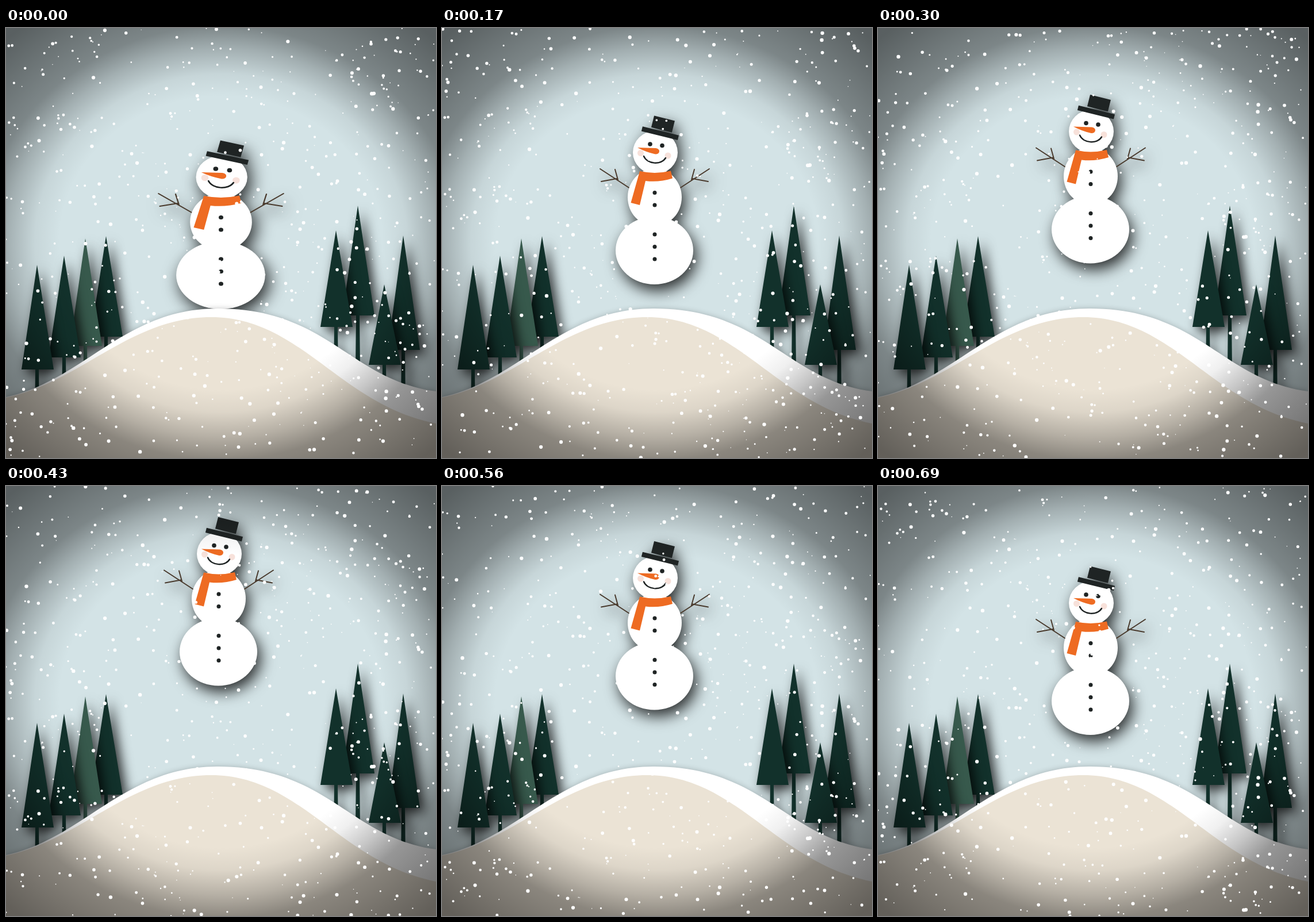
Recreate the animation shown at these times as an HTML page with a canvas. Size 748 by 748 pixels, loop 0.82 s.

```html
<!DOCTYPE html>
<html lang="en">
<head>
<meta charset="utf-8">
<title>Jumping snowman</title>
<style>
  html, body { margin: 0; width: 100%; height: 100%; overflow: hidden; }
  svg, canvas { position: absolute; left: 0; top: 0; width: 748px; height: 748px; }
  .tree { fill: #12312b; filter: drop-shadow(8px 8px 10px rgba(0, 0, 0, .8)); }
  .light { fill: #37594c; }
  .hill { filter: drop-shadow(0 0 5px rgba(0, 0, 0, .22)); }
  #man { filter: drop-shadow(6px 11px 13px rgba(0, 0, 0, .8)); }
  .line { fill: none; stroke: #1f2424; stroke-width: 2.5; stroke-linecap: round; }
  #arms { stroke: #493a2d; stroke-width: 2; }
  .dark { fill: #1f2424; }
  .orange { fill: #ee6b22; }
  .cheek { fill: #f7e1da; }
</style>
</head>
<body>
<svg viewBox="0 0 748 748">
  <defs>
    <radialGradient id="vignette" gradientUnits="userSpaceOnUse" cx="0" cy="0" r="1"
      gradientTransform="translate(374 374) scale(540 490)">
      <stop offset=".52" stop-opacity="0"/>
      <stop offset=".6" stop-opacity=".06"/>
      <stop offset=".69" stop-opacity=".23"/>
      <stop offset=".77" stop-opacity=".41"/>
      <stop offset="1" stop-opacity=".58"/>
    </radialGradient>
  </defs>
  <rect width="748" height="748" fill="#d3e3e6"/>
  <g id="trees"></g>
  <g id="man">
    <g id="arms" class="line"></g>
    <g fill="#fff">
      <ellipse cx="369.5" cy="387" rx="67.5" ry="59"/>
      <ellipse cx="370" cy="294.5" rx="47" ry="50"/>
      <ellipse cx="371" cy="216.5" rx="39" ry="37.5"/>
    </g>
    <g class="dark" transform="translate(380 183) rotate(14)">
      <rect x="-33" y="-4" width="65" height="8.5"/>
      <rect x="-18" y="-27" width="37" height="21"/>
    </g>
    <circle class="cheek" cx="345.5" cy="217.5" r="5.5"/>
    <circle class="cheek" cx="393" cy="222" r="5.5"/>
    <path class="orange" d="M340 208 372 209Q378 210 378 214.500 377.500 219.500 371 219.500 355 216 340 208Z"/>
    <path class="line" d="M351 223C357 237 381 239 389 226"/>
    <path class="orange" d="M344 249Q371 255 398 248.500L401 261.500Q377 269 354 266L344 308 328.500 304Z"/>
    <g class="dark" id="dots"></g>
  </g>
  <path class="hill" fill="#fff" d="M0 642C135 613 205 488 368 488 560 488 598 612 748 632V748H0Z"/>
  <path fill="#ebe3d5" d="M0 643C130 616 215 503 357 503 513 503 580 655 748 688V748H0Z"/>
  <rect width="748" height="748" fill="url(#vignette)"/>
</svg>
<canvas id="snow" width="748" height="748"></canvas>
<script>
  const $ = id => document.getElementById(id);
  const size = 748;

  // The hill hides the foot of each trunk
  const tree = (x, top, base, tone = "") => `<path class="tree ${tone}"
    d="M${x} ${top}L${x + 29} ${base}h-56Z M${x - 3} ${base - 1}h6l1 95h-8Z"/>`;
  $("trees").innerHTML =
    tree(174, 362, 537) + tree(138, 366, 553, "light") + tree(101, 396, 573) + tree(54, 412, 594) +
    tree(612, 309, 500) + tree(574, 352, 520) + tree(691, 361, 560) + tree(658, 446, 586);

  $("arms").innerHTML = [1, -1].map(side =>
    `<path transform="translate(370 245) scale(${side} 1)" d="M43 34 95 0M64 19 69 1M66 17 93 22"/>`).join("");

  const dot = (x, y, r) => `<circle cx="${x}" cy="${y}" r="${r}"/>`;
  let dots = dot(362, 202, 3.8) + dot(383, 204.5, 3.8);
  for (let i = 0; i < 5; i++) dots += dot(370, 286.5 + 21.5 * i + (i > 1 ? 29.5 : 0), 3.5);
  $("dots").innerHTML = dots;

  let seed = 7;
  const random = () => (seed = seed * 16807 % 2147483647) / 2147483647;
  const flakes = Array.from({ length: 680 }, () => ({
    x: random() * size, y: random() * size, r: 0.7 + 2.5 * random()
  }));

  const lift = [43, 0, -36.5, -98.5, -56.5, -13];
  const ctx = $("snow").getContext("2d");
  ctx.fillStyle = "#fff";
  let shown = -1;

  function draw(step) {
    const squash = step ? "" : "translate(374 0) scale(1.145 1) translate(-370 0)";
    $("man").setAttribute("transform", `translate(0 ${lift[step]}) ${squash}`);
    ctx.clearRect(0, 0, size, size);
    ctx.beginPath();
    for (const { x, y, r } of flakes) {
      const fallen = (y + step * size / lift.length) % size;
      ctx.moveTo(x + r, fallen);
      ctx.arc(x, fallen, r, 0, 7);
    }
    ctx.fill();
  }

  // The first pose holds 170 ms, the other five 130 ms each
  function tick() {
    const t = performance.now() % 820;
    const step = Math.max(0, Math.floor((t - 40) / 130));
    if (step !== shown) draw(shown = step);
    requestAnimationFrame(tick);
  }
  tick();
</script>
</body>
</html>
```
